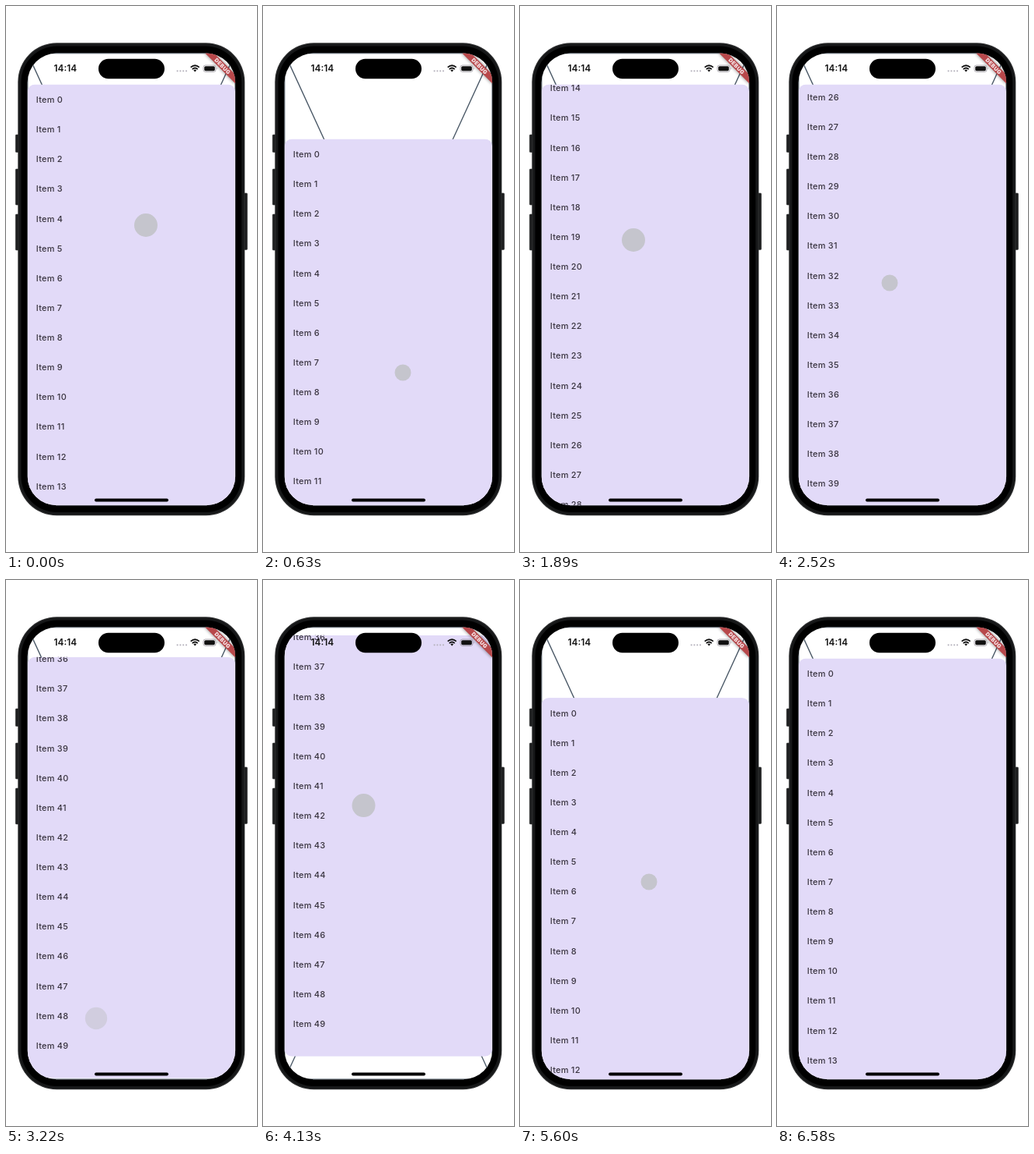
Animation, 323 px wide and 700 px high, one loop 7.61 s. Source, as an HTML page:

```html
<!DOCTYPE html>
<html lang="en">
<head>
<meta charset="utf-8">
<title>Overscrolling sheet</title>
<style>
  html, body { margin: 0; width: 100%; height: 100%; overflow: hidden; background: #fff; }
  svg { display: block; width: 100%; height: 100%; }
  text { font-family: Inter, Roboto, sans-serif; }
  #list text { font-size: 10.9px; font-weight: 500; letter-spacing: .27px; fill: #38333f; }
</style>
</head>
<body>
<svg viewBox="0 0 323 700">
  <defs>
    <clipPath id="screen"><rect x="27.7" y="60.6" width="267.4" height="579.6" rx="37.3"/></clipPath>
    <clipPath id="card"><rect width="267.4" height="540" rx="9.5"/></clipPath>
    <filter id="shade" x="-20%" y="-60%" width="140%" height="220%"><feGaussianBlur stdDeviation="2"/></filter>
    <filter id="soft" x="0" y="0" width="323" height="700" filterUnits="userSpaceOnUse" color-interpolation-filters="sRGB">
      <feGaussianBlur stdDeviation=".4"/>
    </filter>
  </defs>

  <g fill="#1d1e1f" stroke="#3a3b3c" stroke-width=".6">
    <rect x="12.3" y="165" width="5" height="22.5" rx="1"/>
    <rect x="12.3" y="209" width="5" height="46" rx="1"/>
    <rect x="12.3" y="267" width="5" height="46" rx="1"/>
    <rect x="305.5" y="240" width="5" height="72.5" rx="1"/>
  </g>
  <rect x="15.3" y="47.3" width="292" height="606" rx="50" fill="#2b2c2d"/>
  <rect x="16.5" y="48.5" width="289.6" height="603.6" rx="49" fill="#161718"/>
  <rect x="19.5" y="51.5" width="283.6" height="597.6" rx="46" fill="#000"/>

  <g filter="url(#soft)"><g clip-path="url(#screen)">
    <rect x="27" y="60" width="269" height="581" fill="#fff"/>
    <path d="M27.7 60.6H295.1V640.2H27.7ZL295.1 640.2M295.1 60.6L27.7 640.2" fill="none" stroke="#4c5a68" stroke-width="1.36"/>
    <g id="sheet">
      <g clip-path="url(#card)">
        <rect width="268" height="540" fill="#e2daf8"/>
        <g id="list"></g>
      </g>
    </g>

    <g transform="translate(295 60.8) rotate(45)">
      <rect x="-27.2" y="19" width="54.4" height="8.2" fill="#000" opacity=".5" filter="url(#shade)"/>
      <rect x="-27.2" y="19" width="54.4" height="8.2" fill="#b8484b"/>
      <text y="25.7" font-size="7" font-weight="900" letter-spacing=".3" text-anchor="middle" fill="#f6e3e6">DEBUG</text>
    </g>

    <text x="61.6" y="84.2" font-size="11.8" font-weight="600" fill="#111">14:14</text>
    <g fill="#b9b6c0">
      <circle cx="220.6" cy="83.3" r="1.1"/><circle cx="224.4" cy="83.3" r="1.1"/>
      <circle cx="228.2" cy="83.3" r="1.1"/><circle cx="232" cy="83.3" r="1.1"/>
    </g>
    <g fill="none" stroke="#111" stroke-width="1.8">
      <path d="M237.7 78.7Q243.2 73.7 248.7 78.7"/>
      <path d="M239.7 81.1Q243.2 78 246.7 81.1"/>
      <path d="M241.3 82.3Q243.2 80.8 245.1 82.3L243.2 84.4Z" fill="#111" stroke="none"/>
    </g>
    <rect x="254" y="76" width="16" height="8.4" rx="2.6" fill="none" stroke="#8d8992" stroke-width=".7"/>
    <rect x="255.2" y="77.2" width="13.6" height="6" rx="1.6" fill="#111"/>
    <path d="M271 78.8q1.3 1.4 0 2.8z" fill="#8d8992"/>
    <rect x="119" y="67.8" width="85" height="25.4" rx="12.7" fill="#000"/>
    <rect x="114" y="631.5" width="95" height="4" rx="2" fill="#000"/>
    <circle id="touch" fill="#c5c5cd"/>
  </g></g>
</svg>
<script>
  const LOOP = 7610, STEP = 70, LAST = 6580;
  const ROW = 38.13, TOP = 100.5, MAX = 1389.7;
  const TAU = 280, HOLD = 140, FADE = 240, SHRINK = 140, SNAP = 1.6;

  // A finger goes from y0 to y1 and sends the list towards `reach`.
  const drags = [
    { down: -280, up: 560, x: 180, y0: 281, y1: 470, reach: -104 },
    { down: 1120, up: 1400, x: 144, y0: 404, y1: 215, reach: 420 },
    { down: 1540, up: 1890, x: 146, y0: 545, y1: 300, reach: 749 },
    { down: 2240, up: 2450, x: 145, y0: 560, y1: 355, reach: 1427 },
    { down: 3150, up: 3570, x: 116, y0: 562, y1: 350, reach: 1460 },
    { down: 3710, up: 4270, x: 129.5, y0: 385, y1: 255.5, reach: 1426.3 },
    { down: 4410, up: 4620, x: 140, y0: 255, y1: 470, reach: 500 },
    { down: 4760, up: 5040, x: 146, y0: 235, y1: 470, reach: -100 },
    { down: 5180, up: 5530, x: 166, y0: 290, y1: 387, reach: -205 }
  ];

  const $ = id => document.getElementById(id);
  const sheet = $('sheet'), list = $('list'), touch = $('touch');
  const clamp = (v, lo, hi) => Math.min(hi, Math.max(lo, v));
  const inRange = v => clamp(v, 0, MAX);
  const approach = (from, to, ms) => to + (from - to) * Math.exp(-ms / TAU);
  const startOf = d => Math.max(0, d.down + HOLD);

  for (let i = 0; i < 50; i++) {
    const row = document.createElementNS('http://www.w3.org/2000/svg', 'text');
    row.setAttribute('x', 11.1);
    row.setAttribute('y', 23.5 + i * ROW);
    row.textContent = 'Item ' + i;
    list.append(row);
  }

  // Released inside the range the list coasts on; outside it springs back to the edge.
  function moveBy(drag, from, t) {
    const start = startOf(drag);
    if (t <= drag.up) return approach(from, drag.reach, t - start);
    const let_go = approach(from, drag.reach, drag.up - start);
    const edge = inRange(let_go);
    if (edge === let_go) return approach(from, drag.reach, t - start);
    const pos = approach(let_go, edge, t - drag.up);
    return Math.abs(pos - edge) < SNAP ? edge : pos;
  }

  function scrollAt(t) {
    let pos = 0;
    drags.forEach((d, i) => {
      if (t < startOf(d)) return;
      const end = i + 1 < drags.length ? startOf(drags[i + 1]) : LOOP;
      pos = moveBy(d, pos, Math.min(t, end));
    });
    return pos;
  }

  // Presses fade in, hold, drag; releases shrink away.
  function touchAt(t) {
    const d = drags.find(d => t >= d.down && t < d.up + SHRINK);
    if (!d) return { cx: 0, cy: 0, r: 0, opacity: 0 };
    const start = startOf(d);
    const u = clamp((t - start) / (d.up - start), 0, 1);
    const shown = Math.min(1, (t - d.down + STEP) / FADE);
    const gone = Math.max(0, (t - d.up) / SHRINK);
    return {
      cx: d.x,
      cy: d.y0 + (d.y1 - d.y0) * u * u * (3 - 2 * u),
      r: 13 + 2 * shown - 9 * gone,
      opacity: shown
    };
  }

  function draw(t) {
    const pos = scrollAt(t), inside = inRange(pos);
    sheet.setAttribute('transform', `translate(27.7 ${TOP + inside - pos})`);
    list.setAttribute('transform', `translate(0 ${-inside})`);
    for (const [name, value] of Object.entries(touchAt(t))) touch.setAttribute(name, value);
  }

  const begin = performance.now();
  function tick() {
    const t = (performance.now() - begin) % LOOP;
    draw(Math.min(LAST, Math.floor(t / STEP) * STEP));
    requestAnimationFrame(tick);
  }
  tick();
</script>
</body>
</html>
```
